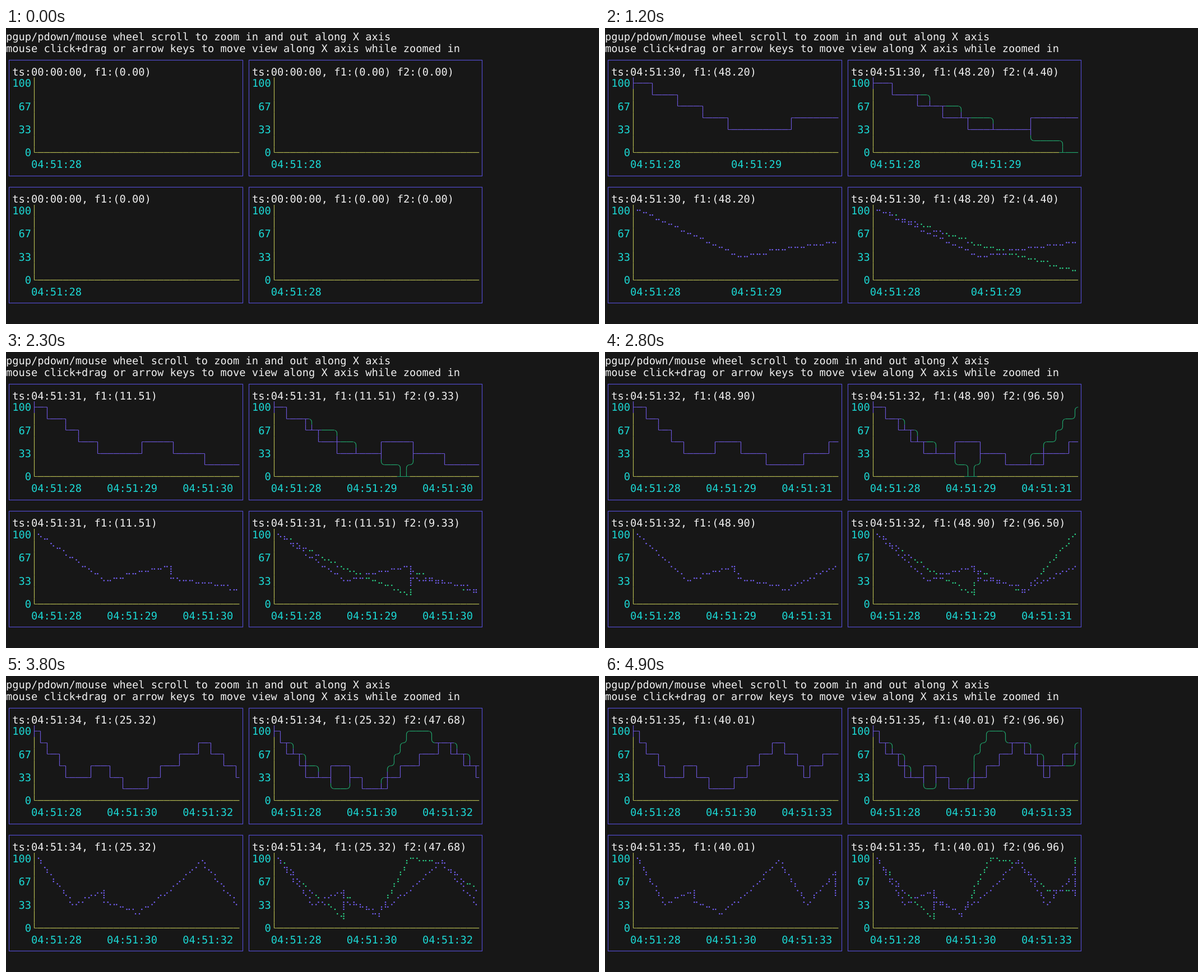
Recreate the animation shown at these times as an HTML page with a canvas. Size 1058 px wide and 529 px high, loop 5700 ms.

```html
<!DOCTYPE html>
<html>
<head>
<meta charset="utf-8">
<style>
html, body { margin: 0; width: 100%; height: 100%; overflow: hidden; background: #171717; }
canvas { display: block; }
</style>
</head>
<body>
<canvas id="stage" width="1058" height="529"></canvas>
<script>
const ctx = document.getElementById('stage').getContext('2d');
const LOOP = 5700;
const STARTS = [100, 600, 1200, 1700, 2300, 2800, 3300, 3800, 4400, 4900];

// Terminal cell size; lines run through cell centres.
const W = 11.256, H = 20.7;
const UP = 1, RIGHT = 2, DOWN = 4, LEFT = 8;
const COLS = 32, ROWS = 6;

const WHITE = '#f0f0f0', CYAN = '#1cd8d4', BORDER = '#524bcb', AXIS = '#b3b850';
const PURPLE = { line: '#6a55d6', dot: '#7460f6' };
const GREEN = { line: '#20a46c', dot: '#2bd88c' };

// Seconds since the first sample, f1, f2
const SAMPLES = [
  [0, 95.62, 96.44], [0.95, 27.37, 44.81], [1.89, 48.2, 4.4], [1.9, 30.54, 37.71],
  [2.85, 11.51, 9.33], [3.8, 48.9, 96.5], [4.74, 91.5, 88.76], [5.7, 25.32, 47.68],
  [6.69, 75.6, 48.35], [6.7, 40.01, 96.96]
];
const CLOCK = [0, 28, 29, 30, 30, 31, 32, 33, 34, 35, 35];

function xLabels(n) {
  if (n < 3) return [28];
  if (n < 5) return [28, 29];
  if (n < 6) return [28, 29, 30];
  if (n < 8) return [28, 29, 31];
  return n < 9 ? [28, 30, 32] : [28, 30, 33];
}

const midX = c => Math.floor((c + 0.5) * W) + 0.5;
const midY = r => Math.floor(15.6 + r * H) + 0.5;

function text(s, col, row, color) {
  ctx.fillStyle = color;
  ctx.fillText(s, col * W, 22.4 + row * H);
}

// Integer line through all samples of one series, on a grid of the given scale
function plot(n, series, width, perUnit, visit) {
  const pts = SAMPLES.slice(0, n);
  if (!n) return;
  const span = pts[n - 1][0];
  const grid = pts.map(p => [
    span ? Math.round(p[0] / span * width) : 1,
    Math.round((100 - p[series]) * perUnit)
  ]);
  visit(...grid[0]);
  for (let k = 1; k < n; k++) {
    const [x, y] = grid[k - 1], dx = grid[k][0] - x, dy = grid[k][1] - y;
    const steps = Math.max(Math.abs(dx), Math.abs(dy), 1);
    const move = (d, i) => Math.sign(d) * Math.ceil(i * Math.abs(d) / steps - 0.5);
    for (let i = 0; i <= steps; i++) visit(x + move(dx, i), y + move(dy, i));
  }
}

function makeCells() {
  const cells = new Map();
  const put = (c, r, arms, color, arc = false) => {
    const key = r * 100 + c, old = cells.get(key);
    cells.set(key, { c, r, color, arms: arms | (old ? old.arms : 0), arc: arc && !old });
  };
  for (let r = 0; r < ROWS; r++) put(0, r, UP | DOWN, AXIS);
  put(0, ROWS, UP | RIGHT, AXIS);
  for (let c = 1; c <= COLS; c++) put(c, ROWS, LEFT | RIGHT, AXIS);
  return { cells, put };
}

function drawCell({ c, r, arms, color, arc }, col, row) {
  const x = midX(col + c), y = midY(row + r);
  const left = (col + c) * W, right = left + W;
  const top = 15.6 + (row + r) * H - H / 2 + 0.2, bottom = top + H;
  ctx.strokeStyle = color;
  ctx.beginPath();
  if (arc) {
    const endY = arms & UP ? top : bottom;
    ctx.moveTo(arms & LEFT ? left : right, y);
    ctx.arcTo(x, y, x, endY, W / 2);
    ctx.lineTo(x, endY);
  } else {
    if (arms & (LEFT | RIGHT)) {
      ctx.moveTo(arms & LEFT ? left : x, y);
      ctx.lineTo(arms & RIGHT ? right : x, y);
    }
    if (arms & (UP | DOWN)) {
      ctx.moveTo(x, arms & UP ? top : y);
      ctx.lineTo(x, arms & DOWN ? bottom : y);
    }
  }
  ctx.stroke();
}

// Stepped line: the rows met in each column are averaged
function addSteps(put, n, series, color, arc) {
  const met = Array.from({ length: COLS + 1 }, () => []);
  plot(n, series, COLS, 0.06, (x, y) => met[x].push(y));
  let prev = 0;
  met.forEach((ys, c) => {
    const next = ys.length ? Math.floor(ys.reduce((a, b) => a + b) / ys.length) : prev;
    if (!c) put(0, next, RIGHT, color);
    else if (next === prev) put(c, next, LEFT | RIGHT, color);
    else {
      const down = next > prev;
      put(c, prev, LEFT | (down ? DOWN : UP), color, arc);
      for (let r = Math.min(prev, next) + 1; r < Math.max(prev, next); r++) put(c, r, UP | DOWN, color);
      put(c, next, RIGHT | (down ? UP : DOWN), color, arc);
    }
    prev = next;
  });
}

// Braille dots: two by four per cell, one colour per cell
function drawDots(n, layers, col, row) {
  const colors = {}, dots = [];
  for (const [series, ink] of layers) {
    plot(n, series, 2 * COLS - 1, 0.23, (x, y) => {
      const key = (x >> 1) + ',' + (y >> 2);
      colors[key] = ink.dot;
      dots.push([x, y, key]);
    });
  }
  const seen = new Set();
  for (const [x, y, key] of dots) {
    if (seen.has(x + ',' + y)) continue;
    seen.add(x + ',' + y);
    ctx.fillStyle = colors[key];
    ctx.beginPath();
    ctx.arc((col + 1 + (x >> 1)) * W + 1.7 + (x & 1) * 4.25,
      11 + (row + (y >> 2)) * H + (y & 3) * 4.25, 1.25, 0, 7);
    ctx.fill();
  }
}

function drawChart(n, col, row, both, dotted) {
  ctx.strokeStyle = BORDER;
  const x = midX(col), y = midY(row);
  ctx.strokeRect(x, y, midX(col + 37) - x, midY(row + 10) - y);

  const last = n ? SAMPLES[n - 1] : [0, 0, 0];
  const time = n ? '04:51:' + CLOCK[n] : '00:00:00';
  const value = s => ` f${s}:(${last[s].toFixed(2)})`;
  text(`ts:${time},${value(1)}${both ? value(2) : ''}`, col + 1, row + 1, WHITE);
  [100, 67, 33, 0].forEach((v, i) => text(String(v).padStart(3), col + 1, row + 2 + i * 2, CYAN));
  const labels = xLabels(n), gap = labels.length > 2 ? 12 : 16;
  labels.forEach((s, i) => text('04:51:' + s, col + 4 + i * gap, row + 9, CYAN));

  const layers = both ? [[2, GREEN], [1, PURPLE]] : [[1, PURPLE]];
  const { cells, put } = makeCells();
  if (n && !dotted) {
    for (const [series, ink] of layers) addSteps(put, n, series, ink.line, ink === GREEN);
  }
  cells.forEach(cell => drawCell(cell, col + 4, row + 2));
  if (dotted) drawDots(n, layers, col + 4, row + 2);
}

function draw(n) {
  ctx.fillStyle = '#171717';
  ctx.fillRect(0, 0, 1058, 529);
  ctx.font = '18.7px "DejaVu Sans Mono", monospace';
  ctx.textRendering = 'geometricPrecision';
  ctx.lineWidth = 1.2;
  text('pgup/pdown/mouse wheel scroll to zoom in and out along X axis', 0, 0, WHITE);
  text('mouse click+drag or arrow keys to move view along X axis while zoomed in', 0, 1, WHITE);
  for (const dotted of [false, true]) {
    for (const both of [false, true]) drawChart(n, both ? 38 : 0, dotted ? 13 : 2, both, dotted);
  }
}

let shown = -1;
function tick() {
  const t = performance.now() % LOOP;
  const n = STARTS.filter(s => t >= s).length;
  if (n !== shown) draw(shown = n);
  requestAnimationFrame(tick);
}
tick();
</script>
</body>
</html>
```
